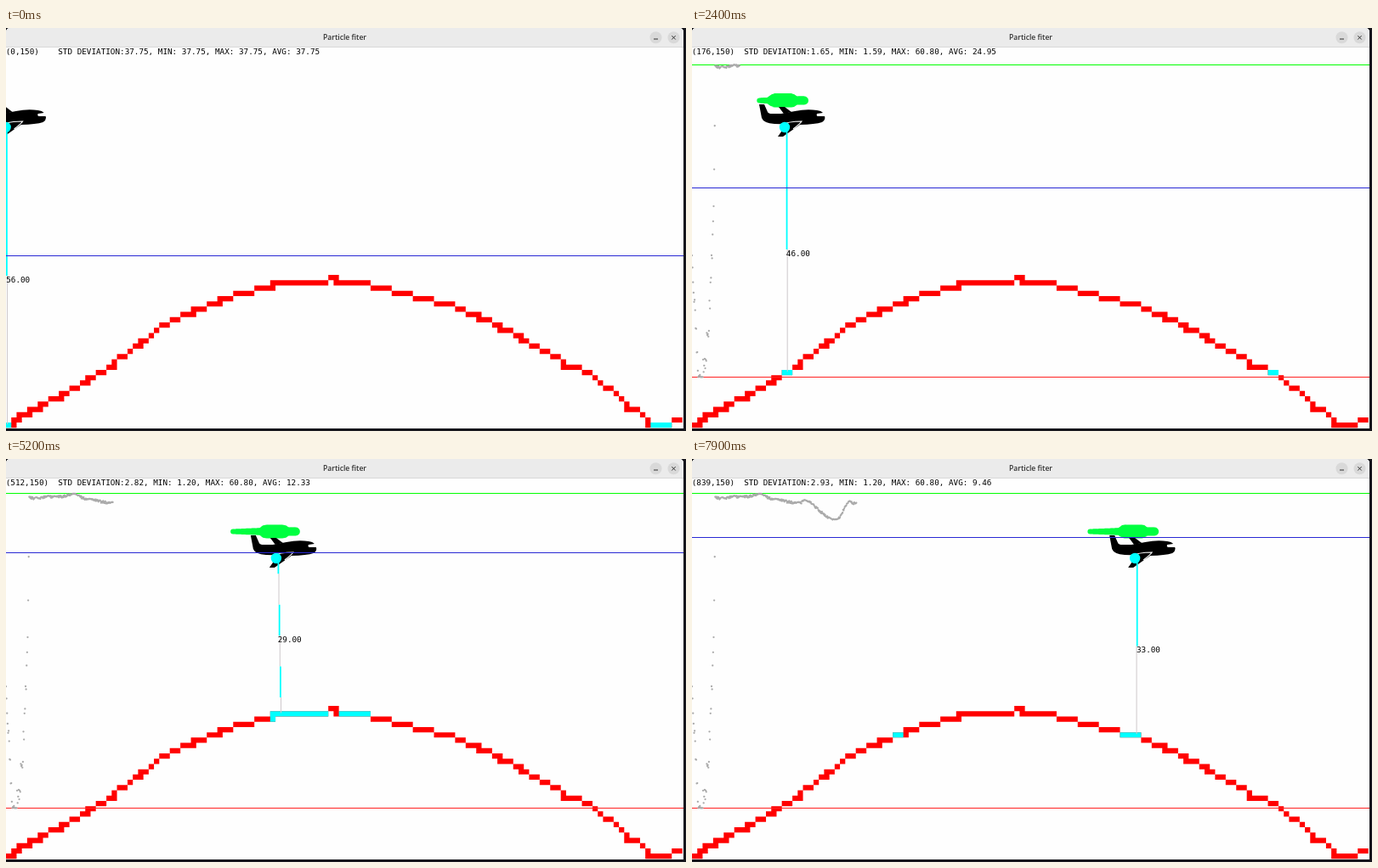
Animation of 800 by 475 pixels, one loop 8 s. Source, as an HTML page:

```html
<!DOCTYPE html>
<html lang="en">
<head>
<meta charset="utf-8">
<title>Particle fiter</title>
<style>
  html, body { margin: 0; width: 100%; height: 100%; overflow: hidden; background: #15151b; }
  svg { display: block; width: 800px; height: 475px; }
  .mono { font: 9.3px "DejaVu Sans Mono", monospace; white-space: pre; }
  .title { font: 600 8.6px "Open Sans", "Noto Sans", sans-serif; fill: #333; }
</style>
</head>
<body>
<svg viewBox="0 0 800 475">
  <rect width="800" height="475" fill="#15151b"/>
  <path d="M0 472V5Q0 0 5 0H792Q797 0 797 5V472Z" fill="#fefefe"/>
  <path d="M0 23V5Q0 0 5 0H792Q797 0 797 5V23Z" fill="#ebebeb"/>
  <path d="M0 22.5H797" stroke="#d8d8d8"/>
  <text class="title" x="398.5" y="14" text-anchor="middle">Particle fiter</text>
  <g fill="#d9d9d9"><circle cx="764.5" cy="11.3" r="7"/><circle cx="785.5" cy="11.3" r="7"/></g>
  <path d="M762 13h5M783.3 9.1l4.4 4.4m0-4.4l-4.4 4.4" stroke="#333" fill="none"/>

  <clipPath id="view"><rect y="23" width="797" height="449"/></clipPath>
  <g clip-path="url(#view)">
    <path id="ground" fill="#f00"/>
    <path id="match" fill="#0ff"/>
    <path id="cloud" fill="#00ff40"/>
    <g id="plane">
      <path d="M-30-27H-24L-20-18Q-19-16-15-16L-4-16 12-19Q26-22 38-20 43-19.5 45-17L38-16Q37-13.5 39-13H47Q48.5-9 44-6 36-3.5 18-3L-12-4Q-25-5-27-11Z"/>
      <path d="M-7-24H0L8-18-1-16Z"/>
      <path d="M20-7L18-3-2 11H-8L-1 1 2-5Z"/>
      <path d="M-5-2.5Q4-7 20-7 18-4 10 2" fill="none" stroke="#fff" stroke-width="1.2"/>
    </g>
    <path id="rayFaint" fill="none" stroke="#cdc8cb"/>
    <path id="ray" fill="none" stroke="#0ff" stroke-width="1.8"/>
    <circle id="sensor" cy="117" r="6.2" fill="#0ff"/>
    <path id="minLine" d="M0 .5H797" stroke="#0f0"/>
    <path id="maxLine" d="M0 .5H797" stroke="#f22"/>
    <path id="avgLine" d="M0 .5H797" stroke="#2828d4"/>
    <path id="history" fill="none" stroke="#aaa" stroke-width="2.3" stroke-linecap="round"/>
    <text id="range" class="mono"></text>
    <text id="stats" class="mono" x="-.3" y="31.4"></text>
  </g>
</svg>
<script>
const LOOP = 8000, FRAME = 100, SCALE = 0.6216, CELL = SCALE * 10, PLANE_Y = 117;
const MERGE = 44, PEAK = 16; // steps: one cluster left, widest spread
const el = Object.fromEntries([...document.querySelectorAll('[id]')].map(n => [n.id, n]));
const lerp = (a, b, t) => a + (b - a) * t;
const hash = n => { const v = Math.sin(n * 127.1 + 3.7) * 43758.5453; return v - Math.floor(v); };
const chartY = v => 33.4 + CELL * v;

// Neighbouring key points around x, and the fraction between them
function between(points, x) {
  let i = 1;
  while (i < points.length - 1 && points[i][0] < x) i++;
  const [[x0, y0], [x1, y1]] = [points[i - 1], points[i]];
  return { y0, y1, t: (x - x0) / (x1 - x0) };
}

// Hill outline as column, depth
const hill = [[0, 55.53], [15, 47.46], [19, 45], [29, 37.3], [35, 34.3], [43, 31.4], [50, 29.4],
  [61.5, 28.4], [69, 29.55], [85, 33.6], [97, 39.1], [99, 40.6], [106, 44.55], [111, 46.87],
  [122, 55.9], [125, 55.9], [126, 55.2], [127, 55.2]];
const depth = Array.from({ length: 128 }, (_, c) => {
  const { y0, y1, t } = between(hill, c);
  return Math.round(lerp(y0, y1, t));
});

// Some columns overlap the deeper row beside them
const overlaps = c => c < 62
  ? depth[c - 1] > depth[c] && (c < 8 || c % 5 === 0)
  : depth[c + 1] > depth[c] && (c === 62 || c % 4 === 1);

const columnPath = (d, c) =>
  `M${c * CELL} ${PLANE_Y + CELL * d}h6.25v${CELL * (overlaps(c) ? 2 : 1)}h-6.25z`;
el.ground.setAttribute('d', depth.map(columnPath).join(''));

// The first steps are heavier to compute, so they lag a little
const stepAt = tick => Math.round(4.015 * tick - 5.4 * Math.min(1, tick / 25));
// Speed doubles once the position is known
const positionAt = step => Math.max(Math.floor(1.5 * step), 3 * step - 97);

// Two far clusters first, then a single one that drifts between key points
const tracking = [[44, 1.81], [57, 1.88], [80, 1.59], [91, 1.65], [129, 1.2], [159, 2.19],
  [203, 2.82], [212, 2.4], [272, 6.08], [299, 2.6], [312, 2.93]];
function deviationAt(step) {
  if (step < MERGE) {
    const base = step < PEAK
      ? 37.75 + 23.05 * Math.sin(Math.PI / 2 * step / PEAK)
      : 60.8 * Math.sqrt(1 - ((step - PEAK) / 27.85) ** 2);
    const noise = (hash(step) - .5) * Math.min(5, step, Math.abs(step - PEAK));
    return Math.min(60.8, base + noise);
  }
  const { y0, y1, t } = between(tracking, step);
  const ease = (1 - Math.cos(Math.PI * t)) / 2;
  return lerp(y0, y1, ease) + hash(step) * .5 * Math.sin(Math.PI * t);
}
const deviation = Array.from({ length: stepAt(79) + 1 }, (_, s) => deviationAt(s));

// A dense core near the plane with a tail as long as the spread
function cloudPath(x, left, right, dir = 1, size = 1) {
  const count = 56;
  let d = '';
  for (let i = 0; i <= count; i++) {
    const p = lerp(left, right, i / count);
    const away = Math.max(0, Math.abs(p + 2) - 10);
    const tail = 5 - 2 * Math.max(0, p / left);
    const r = Math.max(tail, 8 - away * .6) * size;
    d += `M${x + dir * p - r} 85.5a${r} ${r} 0 1 0 ${2 * r} 0a${r} ${r} 0 1 0 ${-2 * r} 0`;
  }
  return d;
}

function cloudAt(step, x, d) {
  if (!step) return '';
  if (step >= MERGE) return cloudPath(x, -18 * deviation[step], 23);
  const reach = Math.max(30, 380 * (1 - step / PEAK));
  const mirror = depth.lastIndexOf(d) * CELL;
  return cloudPath(x, -30, reach) + cloudPath(mirror, -30, reach, -1, Math.sqrt(1 - step / MERGE));
}

// A slightly tilted ray falls into whole-pixel pieces, alternately bright and faint
function drawRay(step, x, d) {
  const n = Math.max(1, step % 6), side = step % 7 < 3 ? 1 : -1;
  const length = d * CELL + 2, paths = ['', ''];
  for (let i = 0; i <= n; i++) {
    const y0 = PLANE_Y + length * Math.max(0, (i - .5) / n);
    const y1 = PLANE_Y + length * Math.min(1, (i + .5) / n);
    paths[(i + n) % 2] += `M${x + side * i * SCALE} ${y0}V${y1}`;
  }
  el.rayFaint.setAttribute('d', paths[0]);
  el.ray.setAttribute('d', paths[1]);
}

function draw(tick) {
  const step = stepAt(tick), pos = positionAt(step);
  const x = pos * SCALE - .4, nextX = positionAt(step + 1) * SCALE;
  const d = depth[Math.floor(pos / 10)];
  const past = deviation.slice(0, step + 1);
  const min = Math.min(...past), max = Math.max(...past);
  const counted = past.slice(0, Math.max(1, step));
  const avg = counted.reduce((a, b) => a + b) / counted.length;

  el.match.setAttribute('d', depth.map((v, c) => v === d ? columnPath(v, c) : '').join(''));
  el.cloud.setAttribute('d', cloudAt(step, x, d));
  el.plane.setAttribute('transform', `translate(${x} ${PLANE_Y})`);
  el.sensor.setAttribute('cx', x);
  drawRay(step, nextX + .3, d);

  const place = (line, v) => line.setAttribute('transform', `translate(0 ${Math.floor(chartY(v))})`);
  place(el.minLine, min);
  place(el.maxLine, max);
  place(el.avgLine, avg);
  el.history.setAttribute('d', past.slice(0, -1).map((v, i) => `M${i * SCALE} ${chartY(v)}h.01`).join(''));

  const f = v => v.toFixed(2);
  el.range.textContent = f(d);
  el.range.setAttribute('x', nextX - .4);
  el.range.setAttribute('y', 299.7 - (56 - d) * CELL / 2);
  el.stats.textContent = `(${pos},150)`.padEnd(11) +
    `STD DEVIATION:${f(deviation[step])}, MIN: ${f(min)}, MAX: ${f(max)}, AVG: ${f(avg)}`;
}

const start = performance.now();
function loop() {
  draw(Math.floor((performance.now() - start) % LOOP / FRAME));
  requestAnimationFrame(loop);
}
loop();
</script>
</body>
</html>
```
